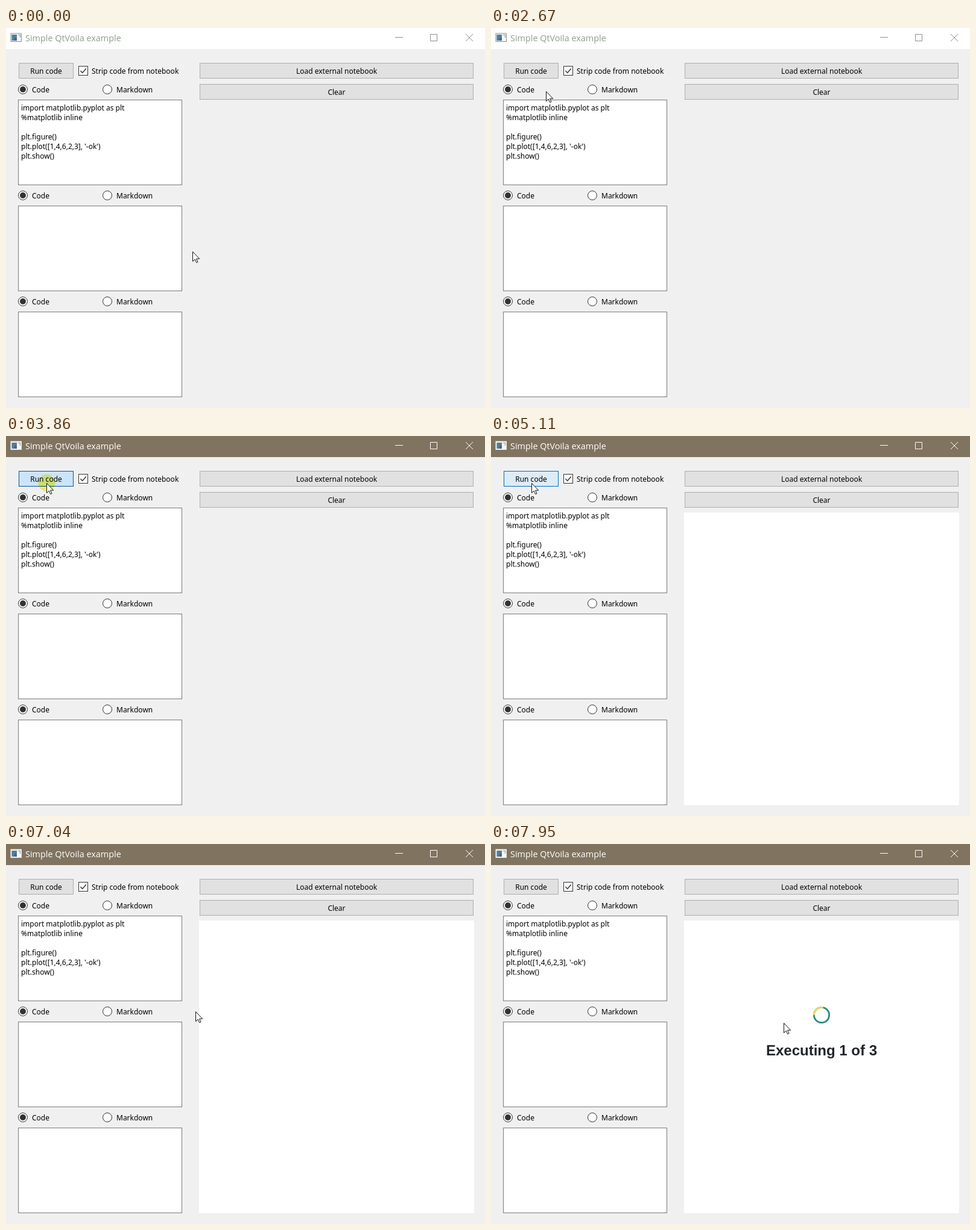
Recreate the animation shown at these times as an HTML page. Size 794 by 631 pixels, loop 8000 ms.

```html
<!DOCTYPE html>
<html lang="en">
<head>
<meta charset="utf-8">
<title>Simple QtVoila example</title>
<style>
  html, body { margin: 0; width: 100%; height: 100%; overflow: hidden; background: #f0f0f0; }
  svg { display: block; width: 794px; height: 631px; }
  text { font: 12px "Noto Sans", "Open Sans", sans-serif; white-space: pre; }
  .mid { text-anchor: middle; }
  .button { fill: #e1e1e1; stroke: #adadad; }
  .field { fill: #fff; stroke: #7a7a7a; }
  .mark { fill: #fff; stroke: #333; }
  #caption text { font: 14.4px "Open Sans", "Noto Sans", sans-serif; }
  #controls { fill: none; }
  #status text { font: bold 24px "Liberation Sans", Arial, sans-serif; fill: #212529; }
  #click { fill: #fbf67c; mix-blend-mode: multiply; }
</style>
</head>
<body>
<svg viewBox="0 0 794 631">
  <rect width="794" height="631" fill="#f0f0f0"/>
  <g id="caption">
    <rect id="bar" width="794" height="35"/>
    <rect id="icon" x="8" y="9" width="17.5" height="13.5" fill="#f6f6f6"/>
    <rect x="9.5" y="11" width="8.5" height="10" fill="#4f7f96"/>
    <rect x="14" y="16" width="4" height="5" fill="#4a6296"/>
    <path d="M20 11.5h4M23.5 12v4" stroke="#8a9299" fill="none"/>
    <text id="title" x="32" y="22">Simple QtVoila example</text>
    <path id="controls" d="M645 15.5h13M703.5 10.5h11v11h-11zM762 10l12 12M774 10l-12 12"/>
  </g>
  <g id="form"></g>
  <rect id="panel" x="320" y="127" width="456" height="486" fill="#fff"/>
  <g id="status">
    <g id="spinner" fill="none" stroke-width="2.8">
      <circle cx="548" cy="284" r="12.6" stroke="#2b8781"/>
      <path d="M535.4 284A12.6 12.6 0 0 1 550.6 271.7" stroke="#ecdf58"/>
    </g>
    <text class="mid" x="548" y="351">Executing 1 of 3</text>
  </g>
  <circle id="click" cx="67.5" cy="78" r="14"/>
  <g id="cursor">
    <path id="arrow" d="M.5 .5V16.6L4.2 13.1 6.7 18.6 9 17.6 6.6 12.2H11.7Z" fill="#fff" stroke="#111"/>
    <path id="beam" d="M-3-7.5H-.5M.5-7.5H3M0-7V7M-3 7.5H-.5M.5 7.5H3" fill="none" stroke="#000"/>
  </g>
</svg>
<script>
const LOOP = 8000;
const FIELD_TOPS = [119, 295, 471];
const CODE = ["import matplotlib.pyplot as plt", "%matplotlib inline", "",
  "plt.figure()", "plt.plot([1,4,6,2,3], '-ok')", "plt.show()"];

// Each move is sampled at evenly spaced steps; path points are [ms, x, y].
const MOVES = [
  { from: 610, to: 1370, steps: 13,
    path: [[550, 309, 371], [800, 299, 342], [1000, 281, 291], [1180, 251.5, 246], [1370, 173.5, 216]] },
  { from: 1420, to: 1850, steps: 8,
    path: [[1360, 173.5, 216], [1600, 118, 190], [1850, 89.5, 171]] },
  { from: 2100, to: 2230, steps: 3,
    path: [[2035, 89.5, 171], [2100, 116, 164], [2165, 155, 162], [2230, 178.5, 167]] },
  { from: 2480, to: 3180, steps: 12,
    path: [[2416, 178.5, 167], [2480, 164, 155], [2671, 91, 105], [2900, 73, 86], [3180, 67, 78]] },
  { from: 6530, to: 7290, steps: 13,
    path: [[6466, 67, 78], [6530, 74, 83], [6700, 143, 137], [7037, 314, 278], [7290, 352, 342]] },
  { from: 7360, to: 7950, steps: 10,
    path: [[7360, 362, 358], [7490, 388, 372], [7620, 412, 362], [7950, 485, 297]] }
];

const $ = id => document.getElementById(id);

function add(tag, attrs, content = "") {
  const el = document.createElementNS("http://www.w3.org/2000/svg", tag);
  for (const name in attrs) el.setAttribute(name, attrs[name]);
  el.textContent = content;
  return $("form").appendChild(el);
}

const label = (x, y, content, cls = "") => add("text", { x, y, class: cls }, content);
const box = (x, y, width, height, cls) =>
  add("rect", { x: x + .5, y: y + .5, width: width - 1, height: height - 1, class: cls });

function button(x, y, width, content) {
  const face = box(x, y, width, 26, "button");
  label(x + width / 2, y + 18, content, "mid");
  return face;
}

function radio(x, y, content, checked) {
  add("circle", { cx: x, cy: y, r: 7.5, class: "mark" });
  if (checked) add("circle", { cx: x, cy: y, r: 5, fill: "#333" });
  label(x + 15, y + 5, content);
}

const runButton = button(21, 58, 91, "Run code");
button(321, 58, 454, "Load external notebook");
button(321, 93, 454, "Clear");
box(120, 63, 16, 16, "mark");
add("path", { d: "M123.5 71l3.2 3.5 6-7", fill: "none", stroke: "#333", "stroke-width": 1.4 });
label(142, 76, "Strip code from notebook");
for (const top of FIELD_TOPS) {
  radio(28, top - 17, "Code", true);
  radio(168, top - 17, "Markdown", false);
  box(20, top, 272, 142, "field");
}
CODE.forEach((line, i) => label(25, 137 + 16 * i, line));

function alongPath(path, t) {
  if (t <= path[0][0]) return path[0].slice(1);
  const i = path.findIndex(p => p[0] >= t);
  if (i < 0) return path[path.length - 1].slice(1);
  const [t0, x0, y0] = path[i - 1], [t1, x1, y1] = path[i];
  const k = (t - t0) / (t1 - t0);
  return [x0 + (x1 - x0) * k, y0 + (y1 - y0) * k];
}

function stepTime({ from, to, steps }, t) {
  const gap = (to - from) / (steps - 1);
  return from + gap * Math.min(steps - 1, Math.floor((t - from + 12) / gap));
}

function cursorAt(t) {
  const move = MOVES.filter(m => t >= m.from).pop();
  return move ? alongPath(move.path, stepTime(move, t)) : MOVES[0].path[0].slice(1);
}

function runColors(t, hovered) {
  if (!hovered) return ["#e1e1e1", "#adadad"];
  if (t < 3800) return ["#e5f1fb", "#0078d7"];
  return t < 5110 ? ["#cce4f7", "#005499"] : ["#ddecf9", "#0069bb"];
}

const show = (id, on) => $(id).setAttribute("visibility", on ? "visible" : "hidden");
const paint = (el, fill, stroke) => { el.style.fill = fill; el.style.stroke = stroke; };

function draw(t) {
  const active = t >= 3800;
  paint($("bar"), active ? "#80735f" : "#fff", "none");
  paint($("title"), active ? "#fff" : "#8f9d8d", "none");
  paint($("controls"), "none", active ? "#fff" : "#8c8c8c");
  paint($("icon"), "#f6f6f6", active ? "#e8edf0" : "#8b8b8b");

  const [x, y] = cursorAt(t);
  const overText = x >= 20 && x < 292 && FIELD_TOPS.some(top => y >= top && y < top + 142);
  const snap = v => Math.round(overText ? v - .5 : v) + (overText ? .5 : 0);
  $("cursor").setAttribute("transform", `translate(${snap(x)} ${overText ? Math.round(y) : snap(y)})`);
  show("arrow", !overText);
  show("beam", overText);

  paint(runButton, ...runColors(t, x >= 21 && x < 112 && y >= 58 && y < 84));
  show("click", t >= 3740 && t < 3920);
  show("panel", t >= 5110);
  show("status", t >= 7700);
  const turn = (stepTime(MOVES[5], t) - 7950) * .18;
  $("spinner").setAttribute("transform", `rotate(${turn} 548 284)`);
}

const start = performance.now();
function tick() {
  draw((performance.now() - start) % LOOP);
  requestAnimationFrame(tick);
}
tick();
</script>
</body>
</html>
```
